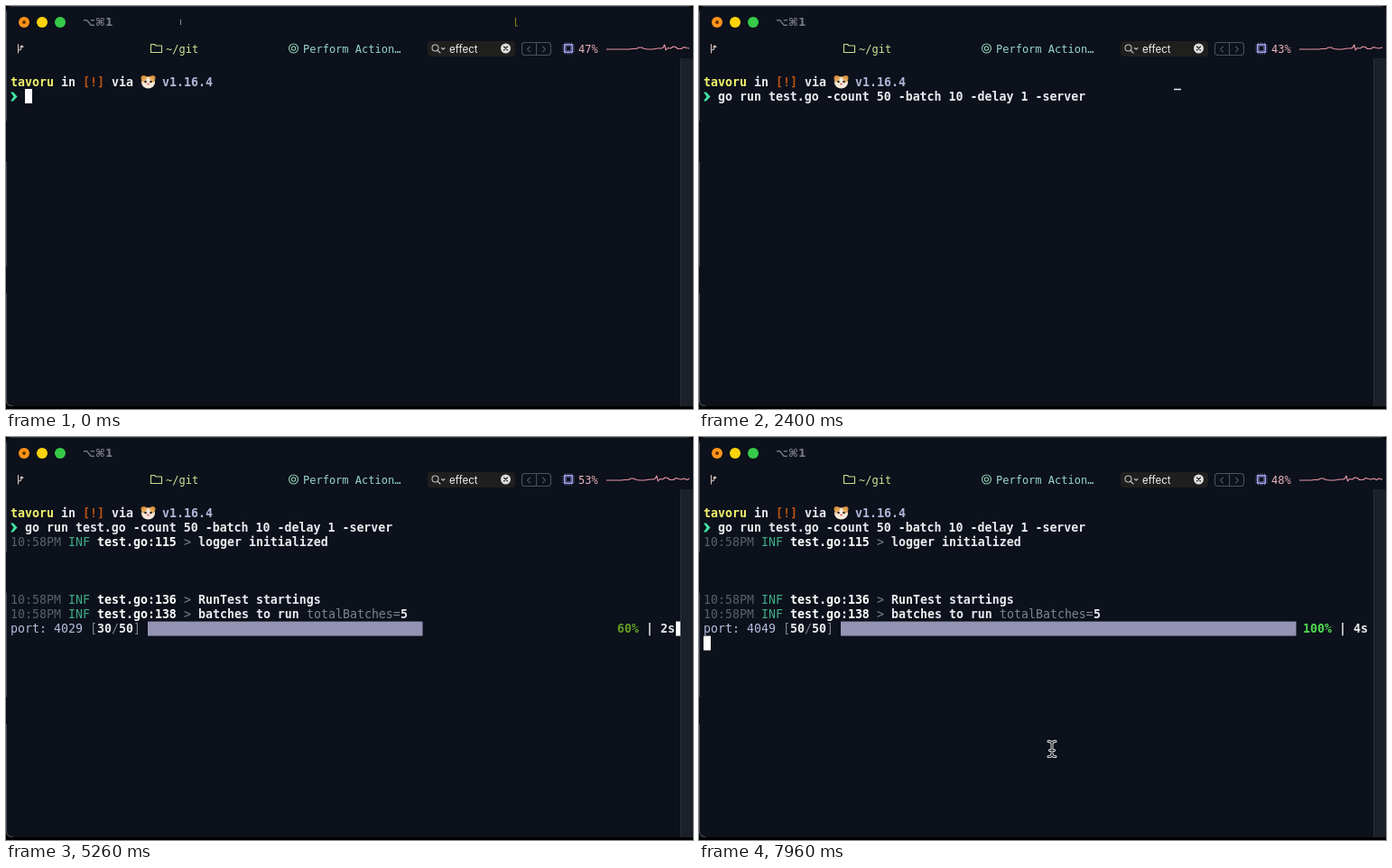
An HTML page for the animation above (8000 ms loop, 761x447 px).

```html
<!DOCTYPE html>
<html lang="en">
<head>
<meta charset="utf-8">
<title>Terminal</title>
<style>
  html, body { margin: 0; width: 100%; height: 100%; overflow: hidden; background: #000; }
  svg { display: block; width: 761px; height: 447px; }
  text { white-space: pre; }
  .mono { font: 400 13.288px "DejaVu Sans Mono", "Noto Sans Mono", monospace; }
  .bar { font: 400 12px "DejaVu Sans Mono", "Noto Sans Mono", monospace; }
  .line { fill: none; stroke-width: 1.1; stroke-linecap: round; stroke-linejoin: round; }
  .white { fill: #e9ebee; font-weight: 700; }
  .bold { fill: #fff; font-weight: 700; }
  .dim { fill: #5a5f68; }
  .grey { fill: #80848b; }
  .info { fill: #3fac86; }
  .lilac { fill: #b9bbdf; }
</style>
</head>
<body>
<svg viewBox="0 0 761 447">
  <defs>
    <clipPath id="graphArea"><path d="M665 40h92v14h-92z"/></clipPath>
    <path id="beam" d="M-4-8.500Q0-8.500 0-5.500Q0-8.500 4-8.500M0-5.500V5.500M-4 8.500Q0 8.500 0 5.500Q0 8.500 4 8.500M-2.500 1.500h5"/>
  </defs>

  <!-- Window -->
  <path d="M0 0H761V444H7Q0 444 0 437Z" fill="#0c111b"/>
  <path d="M747 58h14v386h-14z" fill="#1b2029"/>
  <path d="M747.500 58V444" stroke="#2b3038"/>
  <path d="M.5 6V127M.5 173V288M.5 319V437Q.5 443.500 7 443.500" class="line" stroke="#454a53"/>
  <path d="M0 .5H761" stroke="#30353e"/>
  <path d="M0 0H6Q0 0 0 6ZM761 0H755Q761 0 761 6Z" fill="#000"/>

  <!-- Title bar -->
  <circle cx="20" cy="18" r="6" fill="#ff9419"/>
  <circle cx="20" cy="18" r="2" fill="#6b3200"/>
  <circle cx="40" cy="18" r="6" fill="#fed30b"/>
  <circle cx="60" cy="18" r="6" fill="#36ca49"/>
  <text x="85" y="22" fill="#777a80" style="font:700 12px 'DejaVu Sans',sans-serif">⌥⌘1</text>
  <g id="titleMarks">
    <path d="M193.500 15v6" stroke="#8b8e94"/>
    <path d="M564.500 13v9h2" class="line" stroke="#817f27"/>
  </g>

  <!-- Status bar -->
  <g class="line">
    <path d="M13.500 52V42.500M13.500 49Q17.500 49 17.500 44M16 45.500 17.500 44 19 45.500" stroke="#d9c5c0"/>
    <path d="M160.500 51.500v-9h4l1.500 1.500h6.500v7.500z" stroke="#c8dd8f"/>
    <circle cx="318.500" cy="47" r="5" stroke="#92cfb0"/>
    <circle cx="318.500" cy="47" r="2.200" stroke="#92cfb0"/>
  </g>
  <text class="bar" x="177" y="52" fill="#cfe596">~/git</text>
  <text class="bar" x="329" y="52" fill="#98d6ca">Perform Action…</text>
  <rect x="467" y="39" width="97" height="17" rx="4" fill="#1f1f1e"/>
  <g class="line" stroke="#bfc0c0">
    <circle cx="475.500" cy="46.500" r="3.500"/>
    <path d="M478 49l3 3M482.500 46.500l1.700 1.700 1.700-1.700"/>
  </g>
  <text x="491" y="51.500" fill="#f3f3f3" style="font:400 11.500px Inter,sans-serif">effect</text>
  <circle cx="553.500" cy="47" r="5.500" fill="#dededd"/>
  <path d="M551.500 45l4 4M555.500 45l-4 4" class="line" stroke="#222"/>
  <g class="line" stroke="#4b515b">
    <rect x="571.500" y="40.500" width="32" height="14" rx="3.500"/>
    <path d="M587.500 41v13M580.500 45l-3 3 3 3M594.500 45l3 3-3 3"/>
  </g>
  <g fill="none" stroke="#a19ae6">
    <rect x="618.500" y="42.500" width="9" height="9"/>
    <rect x="620.500" y="44.500" width="5" height="5" stroke-opacity=".45"/>
    <path d="M619.500 40.500v13M622 40.500v2M624 40.500v2M626.500 40.500v13M622 51.500v2M624 51.500v2M616.500 43.500h13M616.500 46h2M616.500 48h2M627.500 46h2M627.500 48h2M616.500 50.500h13" stroke-opacity=".6"/>
  </g>
  <text id="load" class="bar" x="634" y="52" fill="#eab3bd"></text>
  <g clip-path="url(#graphArea)">
    <path id="graph" class="line" stroke="#e995a5" d="M665 48H690L694 47.500 698 47.500 701 46 704 46 707 47.500 711 48 716 48 722 47 726 47 728 46 729.500 43 731 49 733 46.500 736 47 739 45 742 45.500 744 47.500 748 47.500 751 45.500 754 46.500 757 47 760 46 763 47.500 766 46 769 47 773 48"/>
  </g>

  <!-- Terminal -->
  <g class="mono">
    <g id="prompt"></g>
    <g transform="translate(149 76)">
      <circle cx="3.500" cy="4" r="3" fill="#d9913f"/>
      <circle cx="13.500" cy="4" r="3" fill="#d9913f"/>
      <ellipse cx="8.500" cy="9" rx="7.500" ry="6.500" fill="#f5ead9"/>
      <path d="M2 6Q4 2 8 2Q7 7 2 9ZM15 6Q13 2 9 2Q10 7 15 9Z" fill="#e5aa59"/>
      <circle cx="5.500" cy="8" r="1.300" fill="#2d211d"/>
      <circle cx="11.500" cy="8" r="1.300" fill="#2d211d"/>
      <ellipse cx="8.500" cy="10.500" rx="1.500" ry="1" fill="#e66f82"/>
    </g>
    <path d="M5 95.500H8L12.500 100.500 8 105.500H5L8.500 100.500Z" fill="#43e2a6"/>
    <g id="command"></g>
    <path id="caretEdge" d="M526 92.500h8" stroke="#e8e9eb" stroke-width="1.500"/>
    <g id="logs"></g>
    <g id="progress">
      <rect id="fill" x="157" y="204.600" height="16" fill="#9493b3"/>
      <g id="status"></g>
    </g>
  </g>
  <rect id="cursor" height="16" fill="#fff"/>

  <!-- Pointer -->
  <g id="pointer" class="line">
    <use href="#beam" stroke="#e8e8e8" style="stroke-width:3"/>
    <use href="#beam" stroke="#14171d"/>
  </g>
</svg>
<script>
const LOOP = 8000, CELL = 8, LEFT = 5;
const COMMAND_AT = 1250, EXEC_AT = 1500, LOGS_AT = 3100;
const LOAD_EVERY = 800, LOAD_FIRST = 400;
const loads = [47, 44, 42, 43, 45, 48, 50, 53, 53, 50, 48];
const batches = [
  { at: 3370, color: '#b9620f' },
  { at: 4310, color: '#a0871b' },
  { at: 5240, color: '#619d22' },
  { at: 6270, color: '#3fbd3f' },
  { at: 7260, color: '#50d951' }
];
const pointerPath = [[5600, 620, 230], [5830, 520, 326], [6120, 405, 354], [6400, 391, 346]];

const $ = id => document.getElementById(id);
const show = (id, on) => { $(id).style.display = on ? '' : 'none'; };
const col = c => LEFT + c * CELL;
const text = (c, y, cls, str, fill) =>
  `<text x="${col(c)}" y="${y}" class="${cls}"${fill ? ` style="fill:${fill}"` : ''}>${str}</text>`;

const logLine = (y, line, message) =>
  text(0, y, 'dim', '10:58PM') + text(8, y, 'info', 'INF') +
  text(12, y, 'bold', 'test.go:' + line) + text(24, y, 'grey', '&gt;') +
  text(26, y, 'white', message);

$('prompt').innerHTML =
  text(0, 89, 'bold', 'tavoru', '#f4f36c') + text(7, 89, 'white', 'in') +
  text(10, 89, 'bold', '[!]', '#bd5513') + text(14, 89, 'white', 'via') +
  text(21, 89, 'bold', 'v1.16.4', '#b4b6d8');
$('command').innerHTML =
  text(2, 105, 'white', 'go run test.go -count 50 -batch 10 -delay 1 -server');
$('logs').innerHTML =
  logLine(121, 115, 'logger initialized') + logLine(185, 136, 'RunTest startings') +
  logLine(201, 138, 'batches to run') +
  text(41, 201, 'grey', 'totalBatches=') + text(54, 201, 'white', '5');

let shownBatch = -1;
function drawProgress(index) {
  if (index === shownBatch) return;
  shownBatch = index;
  show('progress', index >= 0);
  if (index < 0) return;
  const done = (index + 1) * 10, percent = done * 2;
  $('fill').setAttribute('width', Math.ceil(63 * percent / 100) * CELL + .5);
  $('status').innerHTML =
    text(0, 217, 'lilac', 'port: ' + (3999 + done)) + text(11, 217, 'grey', '[') +
    text(12, 217, 'white', done) + text(14, 217, 'grey', '/') +
    text(15, 217, 'white', '50') + text(17, 217, 'grey', ']') +
    text(83, 217, 'bold', `${percent}%`.padStart(4), batches[index].color) +
    text(88, 217, 'white', '|') + text(90, 217, 'white', index + 's');
}

function cursorAt(t, batch) {
  if (t < COMMAND_AT) return t % 1100 < 550 ? [21, 92] : null;
  if (t < LOGS_AT) return null;
  if (batch < 0) return [LEFT, 204.6];
  return batch < 4 ? [742, 204.6] : [LEFT, 220.6];
}

function pointerAt(t) {
  const next = pointerPath.findIndex(p => p[0] > t);
  if (next === 0) return null;
  if (next < 0) return pointerPath.at(-1).slice(1);
  const [a, b] = [pointerPath[next - 1], pointerPath[next]];
  const k = (t - a[0]) / (b[0] - a[0]);
  return [a[1] + (b[1] - a[1]) * k, a[2] + (b[2] - a[2]) * k];
}

function draw(now) {
  const t = now % LOOP;
  const tick = Math.max(0, Math.floor((t - LOAD_FIRST) / LOAD_EVERY) + 1);
  $('load').textContent = loads[tick] + '%';
  $('graph').setAttribute('transform', `translate(${-1.25 * tick} 0)`);

  show('titleMarks', t < EXEC_AT);
  show('command', t >= COMMAND_AT);
  show('caretEdge', t >= COMMAND_AT && t < LOGS_AT);
  show('logs', t >= LOGS_AT);

  const batch = batches.filter(b => t >= b.at).length - 1;
  drawProgress(batch);

  const cursor = cursorAt(t, batch);
  show('cursor', cursor);
  if (cursor) {
    const [x, y] = cursor;
    $('cursor').setAttribute('x', x);
    $('cursor').setAttribute('y', y);
    $('cursor').setAttribute('width', Math.min(CELL, 747 - x));
  }

  const pointer = pointerAt(t);
  show('pointer', pointer);
  if (pointer) $('pointer').setAttribute('transform', `translate(${pointer})`);
  requestAnimationFrame(draw);
}
show('progress', false);
requestAnimationFrame(draw);
</script>
</body>
</html>
```
